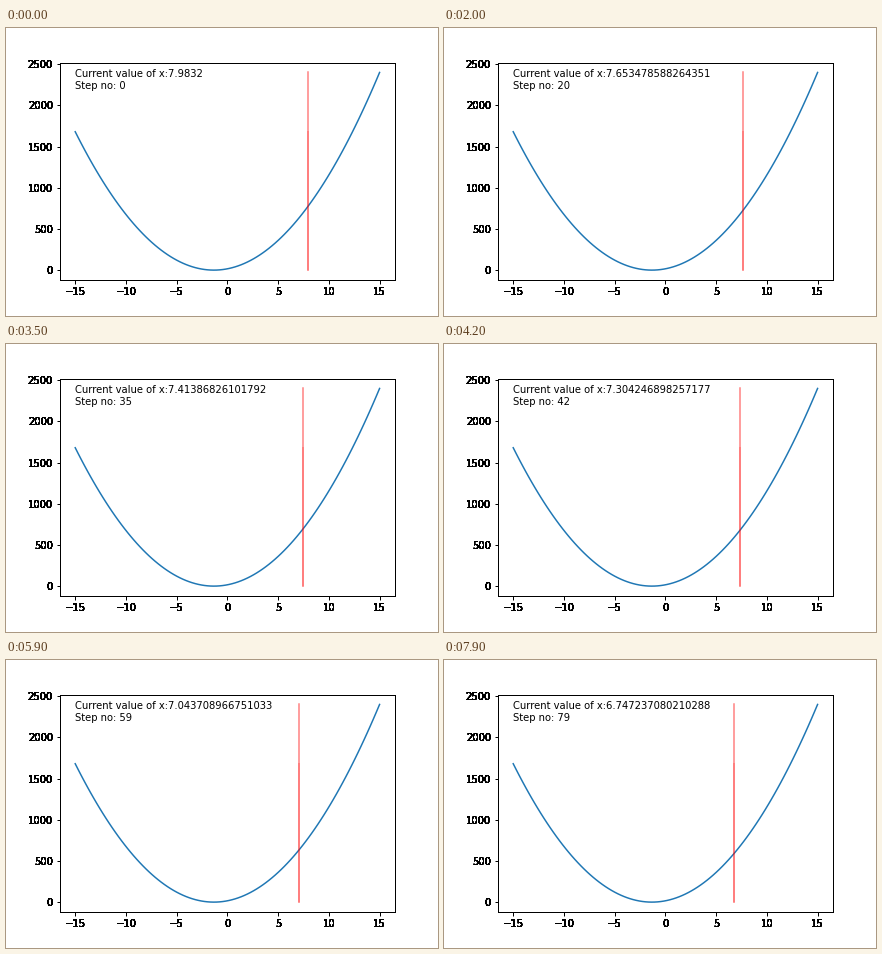
Write a matplotlib script that moves like this. It is 432 px wide and 288 px high and loops after 8 s.

```python
import matplotlib.pyplot as plt
import numpy as np
from matplotlib.animation import FuncAnimation
from matplotlib.axes import Axes

STEPS = 80
RATE = 0.0001
OVERPRINTS = 16


class InkedAxes(Axes):
    """Axes whose tick labels are printed repeatedly, so they turn heavy."""

    def draw(self, renderer):
        super().draw(renderer)
        for label in [*self.get_xticklabels(), *self.get_yticklabels()]:
            for _ in range(OVERPRINTS):
                label.draw(renderer)


def cost(x):
    return (3 * x + 4) ** 2


def slope(x):
    return 18 * x + 24


def descend(x, steps):
    path = []
    for _ in range(steps):
        x = x - RATE * slope(x)
        path.append(x)
    return path


plt.rcParams["font.family"] = "DejaVu Sans"
plt.rcParams["font.size"] = 10
plt.rcParams["axes.linewidth"] = 1

fig = plt.figure(figsize=(6, 4), dpi=72, facecolor="white")
ax = fig.add_axes(InkedAxes(fig, [0.125, 0.125, 0.775, 0.755]))

grid = np.linspace(-15, 15, 100)
values = cost(grid)
guesses = descend(8, STEPS)

ax.plot(grid, values, color="tab:blue", lw=1.5)
# The marker runs down and back up, so its lower part is covered twice.
marker, = ax.plot(np.full_like(grid, guesses[0]), values, "r", lw=1.5, alpha=0.5)
note = ax.text(-15, 2200, "")

ax.set_xlim(-16.5, 16.5)
ax.set_ylim(-120.05, 2521.05)
ax.set_xticks(range(-15, 16, 5))
ax.set_yticks(range(0, 2501, 500))
ax.tick_params(width=1, length=3.5)


def update(step):
    x = guesses[step]
    marker.set_xdata(np.full_like(grid, x))
    note.set_text(f"Current value of x:{x}\nStep no: {step}")
    return marker, note


anim = FuncAnimation(fig, update, frames=STEPS, interval=100, repeat=True)
plt.show()
```
